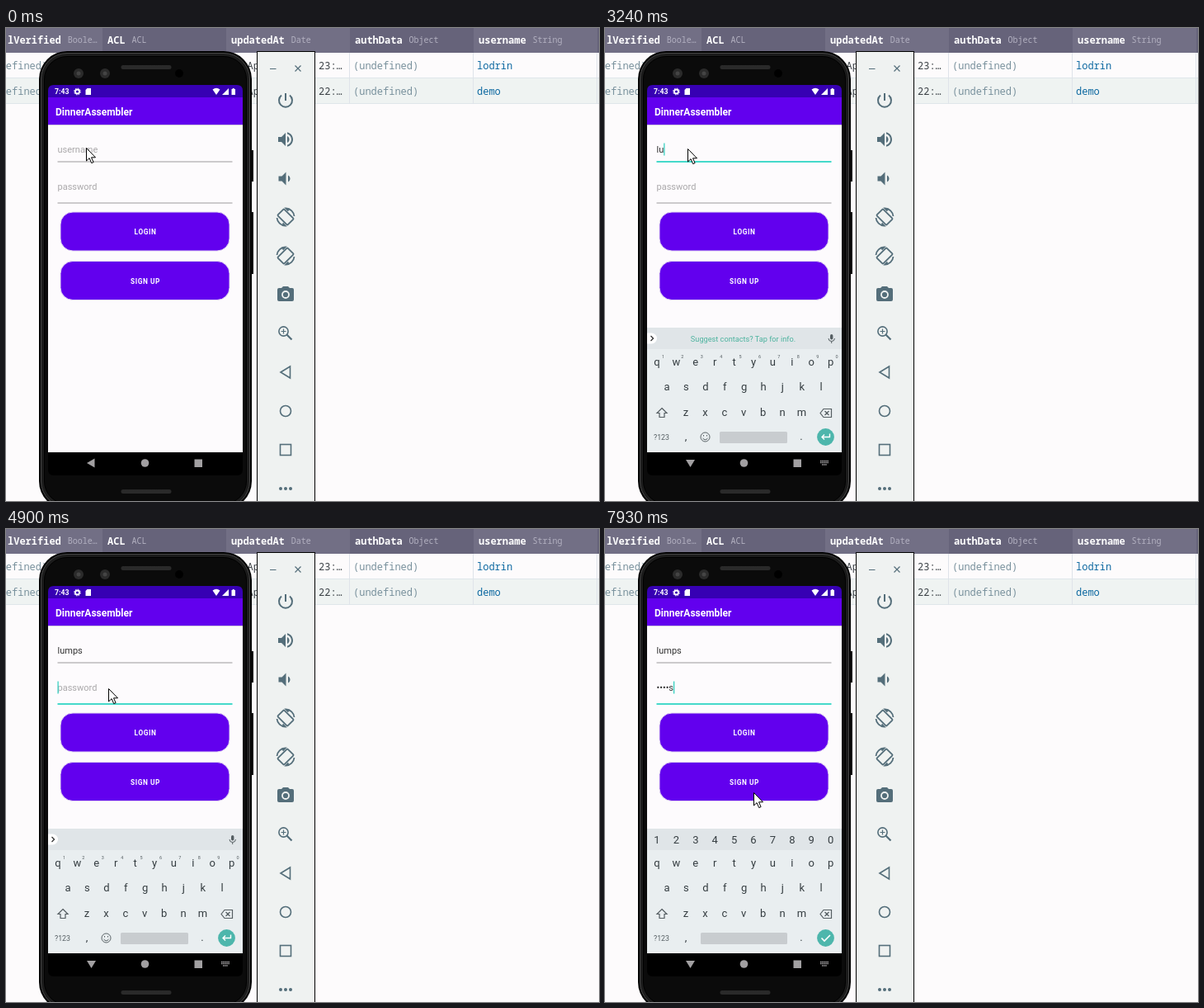
These frames come from a looping animation (719 by 573 pixels, 8 s). An HTML page:

```html
<!DOCTYPE html>
<html lang="en">
<head>
<meta charset="utf-8">
<title>Sign-up demo</title>
<style>
  html, body { margin: 0; width: 719px; height: 573px; overflow: hidden; background: #fdfbfc; }
  svg { display: block; }
  text { white-space: pre; }
  .mono { font: 12px "Noto Sans Mono", monospace; }
  .app { font-family: Roboto, sans-serif; }
  .mid { text-anchor: middle; }
  .field { font-size: 11px; fill: #333; }
  .hint { font-size: 11px; fill: #aaa8aa; }
  .button { font-size: 8.3px; font-weight: 700; letter-spacing: .6px; fill: #fff; }
  .line { fill: none; stroke: #546e7a; stroke-width: 1.6; }
  .key { font-size: 13px; fill: #353d41; }
</style>
</head>
<body>
<svg width="719" height="573" viewBox="0 0 719 573">
  <g id="table" class="mono"></g>

  <!-- phone -->
  <path d="M297 148h3v38h-3zM297 223h3v75h-3z" fill="#161616"/>
  <rect x="40" y="28" width="258" height="555" rx="34"/>
  <rect x="42.5" y="30.5" width="253" height="550" rx="31.5" fill="#1c1c1c" stroke="#464646"/>
  <rect x="46.5" y="34.5" width="245" height="542" rx="27.5" fill="#0b0b0b" stroke="#000"/>
  <path d="M142 47.5h56M142 561.500h56" stroke="#2a2a2a" stroke-width="5" stroke-linecap="round" stroke-dasharray="1 1.5"/>
  <g fill="#2b2b2b"><circle cx="88" cy="55" r="6"/><circle cx="120" cy="55" r="6"/></g>
  <g fill="#444"><circle cx="88" cy="55" r="2.500"/><circle cx="120" cy="55" r="2.500"/></g>
  <circle cx="210" cy="55" r="5"/>

  <g class="app">
    <path d="M51 84v-8q0-7 7-7h222q7 0 7 7v8z" fill="#3700b3"/>
    <rect x="51" y="117" width="236" height="397" fill="#fdfbfd"/>
    <path d="M51 117.500h236" stroke="#cfc6dd"/>
    <rect x="51" y="84" width="236" height="33" fill="#6200ee"/>
    <path d="M51 514h236v21q0 7-7 7h-222q-7 0-7-7z"/>
    <g fill="#fff">
      <text x="59" y="80" font-size="8.700" font-weight="700">7:43</text>
      <path d="M96.500 75l2-2h4.500v8h-6.500zM250.500 74.500q4.500-3.500 9 0l-4.500 6.500zM262 81l8-8v8zM273.500 74h1.200v-1h2v1h1.300v7h-4.500z"/>
      <text x="60" y="106" font-size="12" font-weight="700">DinnerAssembler</text>
    </g>
    <circle cx="86.500" cy="77" r="2.500" fill="none" stroke="#fff" stroke-width="1.800"/>
    <circle cx="86.500" cy="77" r="3.900" fill="none" stroke="#fff" stroke-dasharray="1.500 1.560"/>

    <text id="userHint" class="hint" x="62.500" y="151">username</text>
    <text id="userText" class="field" x="62.500" y="151"></text>
    <path id="userLine" d="M62.500 162h212"/>
    <text id="passHint" class="hint" x="62.500" y="196">password</text>
    <text id="passText" class="field" x="62.500" y="196"></text>
    <path id="passLine" d="M62.500 212h212"/>
    <rect id="caret" width="1.200" height="15" fill="#2bcdbd"/>

    <g fill="#6200ee" stroke="#e0d5f2">
      <rect x="66" y="223" width="205" height="47" rx="15"/>
      <rect x="66" y="282.500" width="205" height="47" rx="15"/>
    </g>
    <text class="button mid" x="169" y="249.500">LOGIN</text>
    <text class="button mid" x="169" y="309.500">SIGN UP</text>

    <!-- on-screen keyboard -->
    <g id="keyboard">
      <rect x="51" y="363" width="236" height="151" fill="#e9eef0"/>
      <rect x="51" y="363" width="236" height="26" fill="#e0e5e8"/>
      <g id="keys" class="key mid"></g>
      <g fill="none" stroke="#555e62" stroke-width="1.200">
        <path d="M69 460.500l6 6h-3v5h-6v-5h-3z"/>
        <path d="M261 466.500l4-5h9.500v10h-9.500zM266.500 464l5 5m0-5l-5 5"/>
      </g>
      <text x="59" y="499" font-size="8.800" fill="#555e62">?123</text>
      <circle cx="267.500" cy="495.500" r="10.400" fill="#4db6ac"/>
      <g id="textMode">
        <path d="M51 369.500h5.500a6.500 6.500 0 0 1 0 13h-5.500z" fill="#fff"/>
        <path d="M55.500 373l3 3-3 3" fill="none" stroke="#333" stroke-width="1.300"/>
        <text id="suggest" class="mid" x="167.500" y="380" font-size="9.200" fill="#4db39f">Suggest contacts? Tap for info.</text>
        <rect x="273" y="371" width="3.400" height="6.500" rx="1.700" fill="#555e62"/>
        <path d="M271 376q0 3.500 3.700 3.500t3.700-3.500m-3.700 3.500v2.500" fill="none" stroke="#555e62"/>
        <g id="superscripts" class="mid" font-size="5.500" fill="#555e62"></g>
        <circle cx="121.500" cy="495.500" r="5.500" fill="none" stroke="#555e62"/>
        <path d="M118.500 497q3 3.500 6 0M119.500 493v1.500m4-1.500v1.500" fill="none" stroke="#555e62"/>
        <rect x="139" y="489" width="82" height="14" rx="1.500" fill="#c8cccf"/>
        <path d="M272.500 491.500v4h-9.500m3-3l-3 3 3 3" fill="none" stroke="#fff" stroke-width="1.400"/>
      </g>
      <g id="passMode">
        <g id="digits" class="key mid"></g>
        <rect x="116" y="489" width="105" height="14" rx="1.500" fill="#c8cccf"/>
        <path d="M262.500 495.500l3.500 3.500 7-7" fill="none" stroke="#fff" stroke-width="1.600"/>
      </g>
    </g>

    <g fill="#a2a0a2">
      <path id="back"/>
      <circle cx="168.500" cy="527" r="4.800"/>
      <rect x="228.500" y="522.500" width="9.500" height="9.500"/>
      <path id="imeIcon" d="M261 524.500h10M261 526.500h10M263 529h6" stroke="#a2a0a2" stroke-width="1.400" stroke-dasharray="1.500 .6"/>
    </g>
  </g>

  <!-- emulator toolbar -->
  <rect x="304.500" y="28.500" width="70" height="560" fill="#eff2f1" stroke="#000"/>
  <g class="line">
    <path d="M320 49.500h7.500M350.500 45.500l7 7m0-7l-7 7" stroke-width="1.200"/>
    <path d="M339 79v9M334 81.500a8 8 0 1 0 10 0" stroke-width="2"/>
    <g id="rotate" transform="translate(339 229)" stroke-width="1.800">
      <rect x="-5.500" y="-8.500" width="11" height="17" rx="1" transform="rotate(-45)"/>
      <path d="M-10.500 1a10.500 10.500 0 0 0 10 9.500l-3-3M10.500-1a10.500 10.500 0 0 0-10-9.500l3 3"/>
    </g>
    <use href="#rotate" transform="matrix(-1 0 0 1 678 47)"/>
    <circle cx="336.500" cy="367.500" r="5.600"/>
    <path d="M340.500 371.500l6 6" stroke-width="2.200"/>
    <path d="M333.500 367.500h6m-3-3v6" stroke-width="1.200"/>
    <path d="M333 417l11.500-7v14z"/>
    <circle cx="339" cy="464" r="6.500"/>
    <rect x="332.500" y="504.500" width="13" height="13"/>
  </g>
  <g fill="#546e7a">
    <path transform="translate(327 123)" d="M3 9v6h4l5 5V4L7 9zM16.500 12c0-1.800-1-3.300-2.500-4v8c1.500-.7 2.500-2.200 2.500-4zM14 3.200v2.100c2.900.9 5 3.500 5 6.700s-2.100 5.800-5 6.700v2.100c4-.9 7-4.500 7-8.800s-3-7.900-7-8.800z"/>
    <path transform="translate(326.500 170.500)" d="M4 9v6h4l5 5V4L8 9zM18 12c0-1.800-1-3.300-2.500-4v8c1.500-.7 2.500-2.200 2.500-4z"/>
    <path d="M336 313h6l2 2h3q2 0 2 2v12q0 2-2 2h-16q-2 0-2-2v-12q0-2 2-2h3z"/>
    <circle cx="333" cy="558" r="2"/><circle cx="339" cy="558" r="2"/><circle cx="345" cy="558" r="2"/>
  </g>
  <circle cx="339" cy="323" r="4" fill="#546e7a" stroke="#eff2f1" stroke-width="1.800"/>

  <path id="pointer" d="M.5.5v15.500l3.600-3.400 2.600 6 2.400-1-2.600-5.800h5z" fill="#fff" stroke="#000"/>
</svg>

<script>
const $ = id => document.getElementById(id);
const show = (id, on) => { $(id).style.display = on ? '' : 'none'; };
const add = (id, markup) => $(id).insertAdjacentHTML('beforeend', markup);
const label = (x, y, text, attrs = '') => `<text x="${x}" y="${y}" ${attrs}>${text}</text>`;

// Data browser behind the phone
const columns = [
  [-33, 2, 'lVerified', 'Boole…'], [117, 123, 'ACL', 'ACL'], [267, 273, 'updatedAt', 'Date'],
  [417, 423, 'authData', 'Object'], [567, 573, 'username', 'String']
];
add('table', '<path d="M0 61h719v31H0z" fill="#eff3f2"/><path d="M0 60.5h719M0 91.5h719" stroke="#dfe6ea"/>');
columns.forEach(([left, x, name, type], i) => add('table',
  `<rect x="${left}" width="150" height="30" fill="${i % 2 ? '#66637a' : '#726f85'}"/>` +
  `<path d="M${left + 149.500} 30v62" stroke="#dfe3ea"/>` +
  label(x, 19, name, 'fill="#fff" font-weight="700"') +
  label(x + name.length * 7.200 + 8, 18, type, 'fill="#b3b1c1" font-size="10"')));
add('table', '<rect x="717" width="2" height="30" fill="#66637a"/>');
[['23', 'lodrin'], ['22', 'demo']].forEach(([hour, user], i) => {
  const cell = (column, text, color) =>
    add('table', label(columns[column][0] + 4, 50 + 31 * i, text, `fill="${color}"`));
  cell(0, '(undefined)', '#78909c');
  cell(2, `18 Apr 2021 at ${hour}:…`, '#3c4247');
  cell(3, '(undefined)', '#78909c');
  cell(4, user, '#0e69a1');
});

// Keyboard rows share one pitch
const row = (id, chars, x, y) =>
  [...chars].forEach((c, i) => add(id, label(x + i * 23.400, y, c)));
row('keys', 'qwertyuiop', 63, 409);
row('keys', 'asdfghjkl', 75, 439);
row('keys', 'zxcvbnm', 98, 470);
row('keys', ',', 98, 499);
row('keys', '.', 238, 499);
row('superscripts', '1234567890', 70.500, 400);
row('digits', '1234567890', 63, 381);

// Each step: start time, then value
const pointerSteps = [
  [0, [97, 145]], [250, [99, 146]], [390, [100, 146]], [4280, [107, 136]],
  [4420, [112, 150]], [4540, [120, 178]], [4660, [124, 193]], [7380, [142, 232]],
  [7500, [159, 268]], [7640, [172, 286]], [7790, [176, 295]], [7930, [180, 319]]
];
const userSteps = [[0, ''], [2570, 'l'], [3240, 'lu'], [3480, 'lum'], [3600, 'lumps']];
const passSteps = [[0, ''], [5670, 'l'], [5920, '•u'], [6070, '••m'], [6350, '•••p'], [6600, '••••s']];
const caretSteps = [
  [0, false], [920, true], [1440, false], [1970, true], [2990, false], [3240, true], [4140, false],
  [4780, true], [5300, false], [5670, true], [7100, false], [7640, true]
];
const valueAt = (steps, t) => steps.findLast(([start]) => start <= t)[1];

function drawField(name, text, focused) {
  $(name + 'Text').textContent = text;
  show(name + 'Hint', !text);
  const line = $(name + 'Line');
  line.setAttribute('stroke', focused ? '#45d9ca' : '#bcbabc');
  line.setAttribute('stroke-width', focused ? 2 : 1.400);
}

function draw(now) {
  const t = now % 8000;
  const inPassword = t >= 4780;
  drawField('user', valueAt(userSteps, t), t >= 920 && !inPassword);
  drawField('pass', valueAt(passSteps, t), inPassword);
  $('userHint').style.fill = t >= 920 && t < 1050 ? '#777' : '';

  const active = $(inPassword ? 'passText' : 'userText');
  $('caret').setAttribute('x', 62.500 + (active.textContent ? active.getComputedTextLength() : 0));
  $('caret').setAttribute('y', inPassword ? 184.500 : 139.500);
  show('caret', valueAt(caretSteps, t));

  const numeric = t >= 5180;
  show('keyboard', t >= 3240);
  show('textMode', !numeric);
  show('passMode', numeric);
  show('suggest', t < 4900);

  const imeOpen = t >= 1970;
  show('imeIcon', imeOpen);
  $('back').setAttribute('d', imeOpen ? 'M98 523h11l-5.5 9z' : 'M98 527l9.500-5.500v11z');
  $('pointer').setAttribute('transform', `translate(${valueAt(pointerSteps, t)})`);
  requestAnimationFrame(draw);
}
requestAnimationFrame(draw);
</script>
</body>
</html>
```
